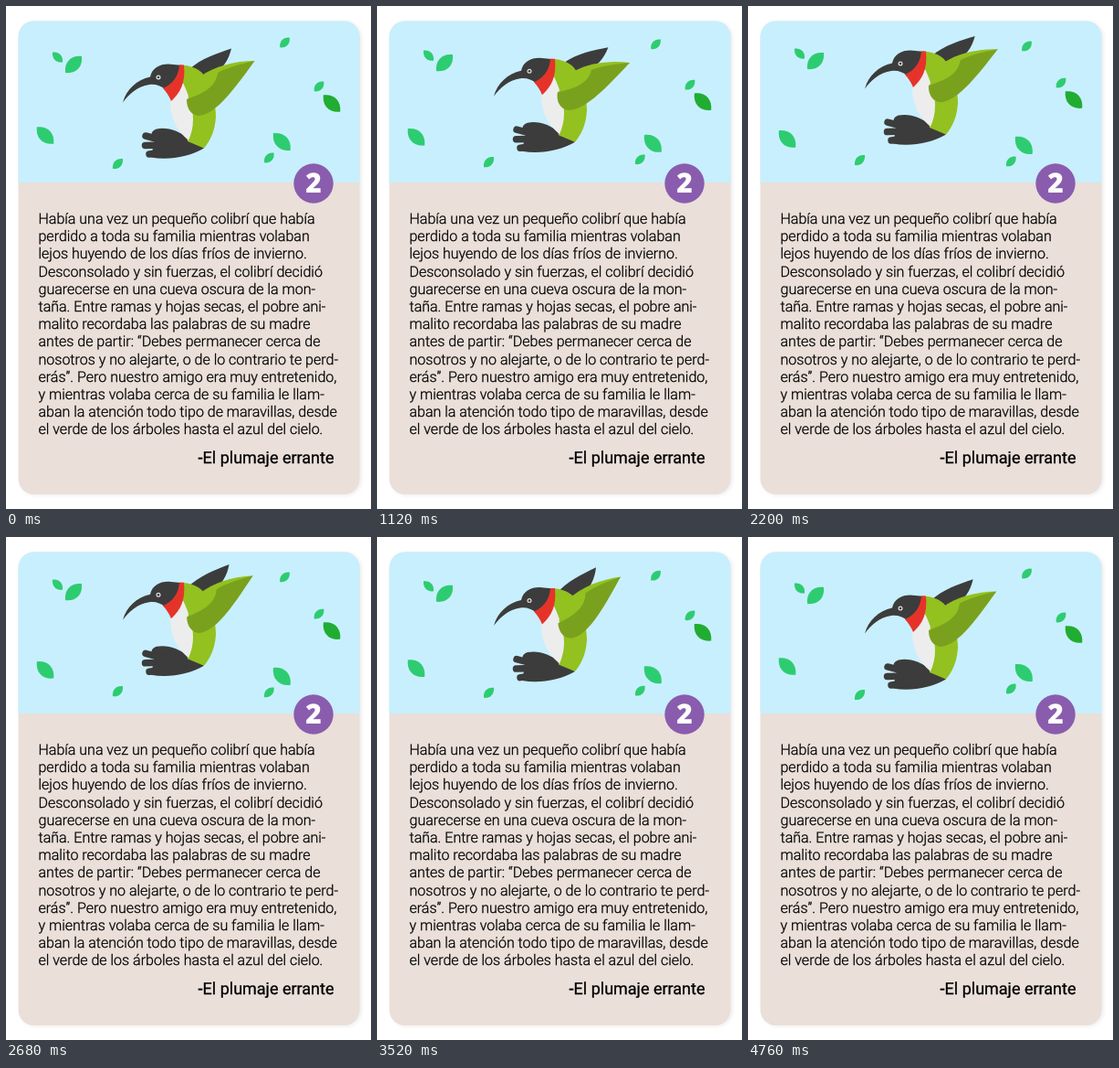
These frames come from a looping animation (400x550 px, 4800 ms). An HTML page with a canvas:

```html
<!DOCTYPE html>
<html lang="es">
<head>
<meta charset="utf-8">
<title>Cuento</title>
<style>
  html, body { margin: 0; width: 100%; height: 100%; overflow: hidden; background: #fff; }
  canvas, svg { position: absolute; left: 0; top: 0; width: 400px; height: 550px; }
  text { font-family: Roboto, sans-serif; white-space: pre; text-rendering: geometricPrecision; }
  #story, #title { stroke: #000; stroke-width: .3px; }
  #story { font-size: 16px; font-weight: 300; }
  #title { font-size: 18px; font-weight: 400; text-anchor: end; }
  #badge { font: 800 30px "Open Sans", sans-serif; fill: #fff; text-anchor: middle; }
</style>
</head>
<body>
<canvas id="stage" width="400" height="550"></canvas>
<svg viewBox="0 0 400 550">
  <text id="badge" x="337" y="204.3">2</text>
  <g id="story"></g>
  <text id="title" x="359.5" y="500">-El plumaje errante</text>
</svg>
<script>
const LOOP = 4800, STEP = 40;
const ctx = document.getElementById('stage').getContext('2d');
const DARK = '#3c3c3c', LIME = '#93c120', OLIVE = '#7aa11d';

const lines = [
  'Había una vez un pequeño colibrí que había',
  'perdido a toda su familia mientras volaban',
  'lejos huyendo de los días fríos de invierno.',
  'Desconsolado y sin fuerzas, el colibrí decidió',
  'guarecerse en una cueva oscura de la mon-',
  'taña. Entre ramas y hojas secas, el pobre ani-',
  'malito recordaba las palabras de su madre',
  'antes de partir: “Debes permanecer cerca de',
  'nosotros y no alejarte, o de lo contrario te perd-',
  'erás”. Pero nuestro amigo era muy entretenido,',
  'y mientras volaba cerca de su familia le llam-',
  'aban la atención todo tipo de maravillas, desde',
  'el verde de los árboles hasta el azul del cielo.'
];
lines.forEach((line, i) => {
  const el = document.createElementNS('http://www.w3.org/2000/svg', 'text');
  el.setAttribute('x', 35.5);
  el.setAttribute('y', Math.round(238 + i * 19.2));
  el.textContent = line;
  document.getElementById('story').append(el);
});

const path = d => new Path2D(d);
const bird = {
  backWing: path('M200 70 C214 57 231 52 247 46.5 C244 59 238 70 222 77 L206 90 Z'),
  body: path('M190 64.5 C204 65 214 69 219 79 C226 92 230 108 230 121 C229 137 224 147 217 155.5 L199 148 L195 110 L190 90 Z'),
  belly: path('M194 84 C200 96 205 112 205 124 C205 133 203 140 200 147 C188 137 180 124 180 104 Z'),
  head: path('M128 105.5 C132 91 143 81 158 77.5 C160 68 168 63.5 178 63.5 L194 65 L188 84 L174 91 C170 87 163 85 157 86 C144 88 135 96 128 105.5 Z'),
  throat: path('M190 64.5 L195 64.5 C197 84 191 95 181 104 C179 99 176 94 172 90 C183 85 189 77 190 64.5 Z'),
  tail: path('M200 145 C190 137 177 132 165 134.5 C158 137 158 142 163 146 L160 160 L159 165.5 C178 169 201 165 217 155.5 Z'),
  wingTop: path('M272.5 60 C251 60 228 66 213 77 C203 86 198 96 200 107 L230 98 Z'),
  wing: path('M272.5 60 C257 63.5 243 67 232 73 C230 88 218 95 198 102 C198 113 203 119 211 120 C228 119 246 97 272.5 60 Z')
};
const tailFeathers = [[153, 142, 172, 147], [152.5, 152.5, 172, 152], [157, 162, 178, 159]];

// x, y, half size, bob direction, horizontal flip, colour
const leaves = [
  [56.5, 54, 5.5, 1, 1], [74, 62, 9, 1, -1], [43, 143.5, 9.2, -1, 1],
  [122.5, 170.5, 5.5, 1, -1], [305.5, 42, 5.3, -1, -1], [343, 86, 5.3, 1, -1],
  [357, 104.5, 9.2, 1, 1, '#20ad32'], [302.3, 150.5, 9.4, -1, 1], [288.3, 168, 5.3, -1, -1]
];
const leafShape = path('M-1 -1 C.25 -1.15 1.15 -.35 1 1 C-.25 1.15 -1.15 .35 -1 -1 Z');

function fill(shape, color) {
  ctx.fillStyle = color;
  ctx.fill(shape);
}

function dot(x, y, r, color) {
  ctx.fillStyle = color;
  ctx.beginPath();
  ctx.arc(x, y, r, 0, Math.PI * 2);
  ctx.fill();
}

function drawCard() {
  ctx.clearRect(0, 0, 400, 550);
  const card = new Path2D();
  card.roundRect(13.5, 16.5, 374, 517.5, 17);
  ctx.save();
  ctx.shadowColor = 'rgba(0,0,0,.08)';
  ctx.shadowBlur = 4;
  ctx.shadowOffsetX = 2;
  ctx.shadowOffsetY = 1;
  fill(card, '#eadfd9');
  ctx.restore();
  ctx.save();
  ctx.clip(card);
  ctx.fillStyle = '#c8effe';
  ctx.fillRect(13, 16, 375, 177);
  ctx.restore();
}

function drawLeaf([x, y, size, dir, flip, color = '#2ecc71'], bob) {
  ctx.save();
  ctx.translate(x, y + dir * bob * 2);
  ctx.scale(size * flip, size);
  fill(leafShape, color);
  ctx.restore();
}

function swing(angle, draw) {
  ctx.save();
  ctx.translate(205, 100);
  ctx.rotate(angle);
  ctx.translate(-205, -100);
  draw();
  ctx.restore();
}

function drawBird(bob, angle) {
  ctx.save();
  ctx.translate(0, (bob - 1) * 7.6);
  swing(angle, () => fill(bird.backWing, DARK));
  fill(bird.tail, DARK);
  ctx.strokeStyle = DARK;
  ctx.lineWidth = 7.5;
  ctx.lineCap = 'round';
  for (const [x1, y1, x2, y2] of tailFeathers) {
    ctx.beginPath();
    ctx.moveTo(x1, y1);
    ctx.lineTo(x2, y2);
    ctx.stroke();
  }
  fill(bird.body, LIME);
  fill(bird.belly, '#ededed');
  fill(bird.head, DARK);
  fill(bird.throat, '#e6332a');
  dot(167, 78, 2.5, '#e4e4e4');
  dot(167, 78, 1.3, DARK);
  swing(angle, () => {
    fill(bird.wingTop, LIME);
    fill(bird.wing, OLIVE);
  });
  ctx.restore();
}

function render(now) {
  const time = Math.floor((now % LOOP) / STEP) * STEP;
  const phase = time / LOOP * Math.PI * 2;
  const bob = Math.cos(phase);
  drawCard();
  leaves.forEach(leaf => drawLeaf(leaf, bob));
  drawBird(bob, Math.sin(phase) * 7.2 * Math.PI / 180);
  dot(337, 194, 21.7, '#8a5cae');
}

const start = performance.now();
function tick() {
  render(performance.now() - start);
  requestAnimationFrame(tick);
}
tick();
</script>
</body>
</html>
```
